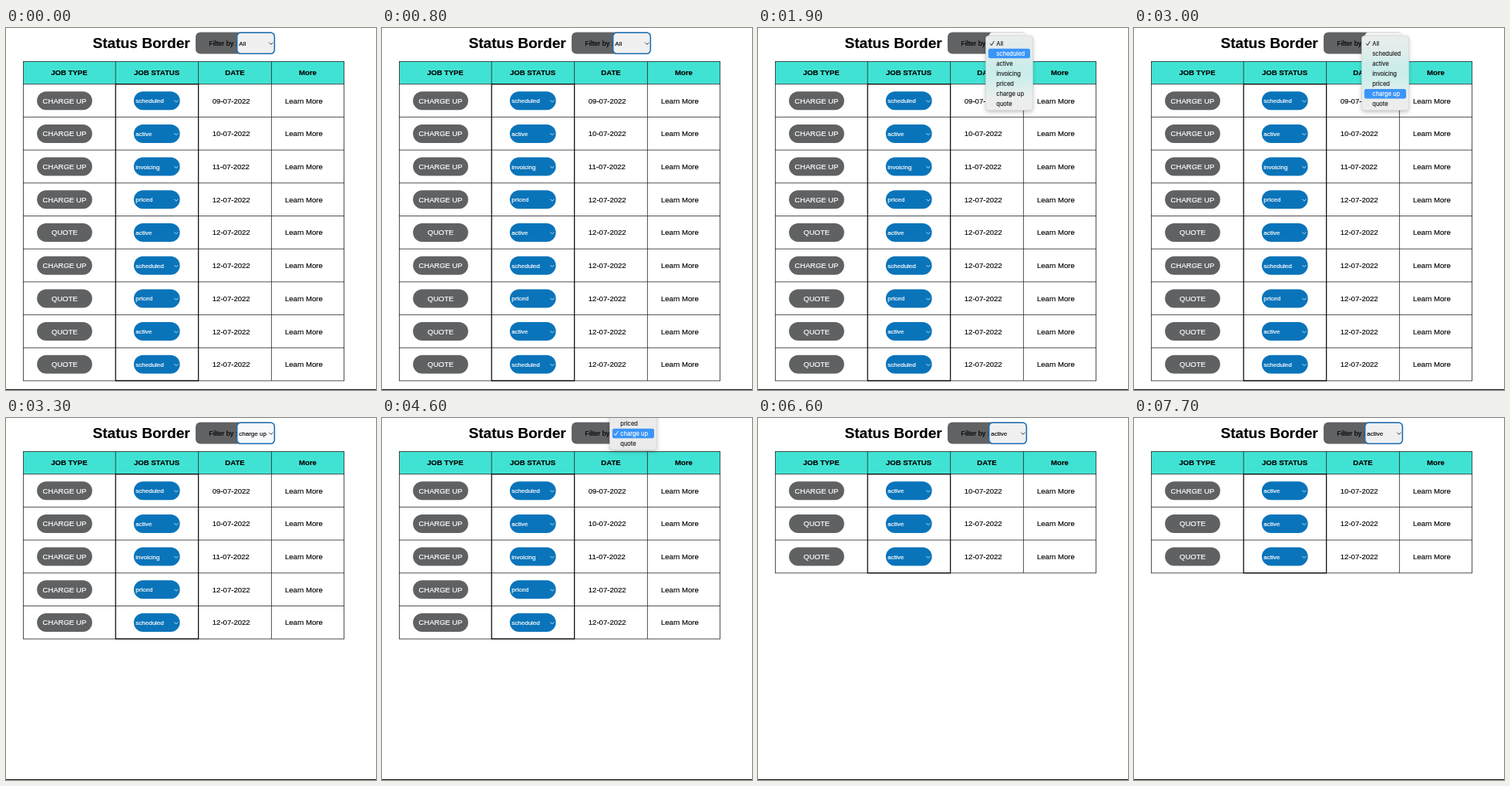
Write an HTML page that moves like this. It is 480 by 469 pixels and loops after 8200 ms.

```html
<!DOCTYPE html>
<html lang="en">
<head>
<meta charset="utf-8">
<title>Status Border</title>
<style>
html, body { margin: 0; width: 100%; height: 100%; overflow: hidden; background: #fff; }
svg { display: block; width: 480px; height: 469px; font-family: "Liberation Sans", Arial, sans-serif; font-size: 9.55px; }
text { fill: #000; stroke: #000; stroke-width: .15; }
.title { font-size: 19.1px; font-weight: bold; }
.head { font-weight: bold; text-anchor: middle; }
.grid { fill: none; stroke: #222; stroke-width: .8; }
.cell { fill: none; stroke: #111; stroke-width: 1.3; }
.type { fill: #5f6163; }
.status { fill: #0a74ba; }
.light { fill: #fff; stroke: #fff; stroke-width: .2; }
.mid { text-anchor: middle; }
.small { font-size: 8px; }
.chevron { fill: none; stroke: #222; stroke-width: .9; }
.chevron.pale { stroke: #d5e8f5; }
.menu text { font: 7.5px Inter, sans-serif; fill: #1c1c1c; stroke: #1c1c1c; }
.menu .on { fill: #fff; stroke: #fff; }
</style>
</head>
<body>
<svg viewBox="0 0 480 469">
  <defs>
    <linearGradient id="glass" gradientUnits="userSpaceOnUse" x1="0" y1="10" x2="0" y2="107">
      <stop offset="0" stop-color="#ebecec"/>
      <stop offset=".22" stop-color="#e0ecec"/>
      <stop offset=".42" stop-color="#c9edea"/>
      <stop offset=".58" stop-color="#ceeeeb"/>
      <stop offset=".82" stop-color="#ebeeee"/>
      <stop offset="1" stop-color="#ededed"/>
    </linearGradient>
    <filter id="shadow" x="-30%" y="-20%" width="160%" height="150%">
      <feDropShadow dx="0" dy="2" stdDeviation="2.5" flood-opacity=".25"/>
    </filter>
  </defs>
  <text class="title" x="112.5" y="26">Status Border</text>
  <rect x="246" y="5.5" width="103" height="28" rx="6" fill="#616264"/>
  <text x="263.3" y="22.8" font-size="8.96">Filter by :</text>
  <g id="filter"></g>
  <g id="table"></g>
  <g id="menu" class="menu"></g>
  <path d="M0 468H480V469H0Z" fill="#111"/>
</svg>
<script>
const LOOP = 8200;
const TOP = 72.7, ROW = 42.7;
const options = ["All", "scheduled", "active", "invoicing", "priced", "charge up", "quote"];
const jobs = [
  ["CHARGE UP", "scheduled", "09"],
  ["CHARGE UP", "active", "10"],
  ["CHARGE UP", "invoicing", "11"],
  ["CHARGE UP", "priced", "12"],
  ["QUOTE", "active", "12"],
  ["CHARGE UP", "scheduled", "12"],
  ["QUOTE", "priced", "12"],
  ["QUOTE", "active", "12"],
  ["QUOTE", "scheduled", "12"]
];
// start time, chosen option, hovered option (null while the menu is closed)
const steps = [
  [0, 0, null],
  [900, 0, 0],
  [1400, 0, 1],
  [2000, 0, 3],
  [2600, 0, 5],
  [3200, 5, null],
  [4600, 5, 5],
  [5000, 5, 4],
  [5100, 5, 2],
  [6200, 2, null]
];

const el = id => document.getElementById(id);
const text = (x, y, str, cls = "") => `<text x="${x}" y="${y}" class="${cls}">${str}</text>`;
const rect = (x, y, w, h, r, attrs) =>
  `<rect x="${x}" y="${y}" width="${w}" height="${h}" rx="${r}" ${attrs}/>`;
const chevron = (x, y, cls = "") =>
  `<path class="chevron ${cls}" d="M${x - 2.5} ${y - 1.2}l2.5 2.5l2.5 -2.5"/>`;

function drawRow([type, status, day], i) {
  const y = TOP + i * ROW, mid = y + 21.5, base = mid + 3.4;
  return `<path class="grid" d="M22 ${y + ROW}H439"/>` +
    rect(40.2, mid - 12, 71.6, 24, 12, 'class="type"') +
    text(76, base, type, "light mid") +
    rect(165.8, mid - 12, 59.8, 24, 12, 'class="status"') +
    text(168.3, mid + 3, status, "light small") +
    chevron(220.8, mid + .6, "pale") +
    text(267.8, base, day + "-07-2022") +
    text(362, base, "Learn More");
}

function drawTable(choice) {
  const name = options[choice];
  const rows = jobs.filter(([type, status]) =>
    choice === 0 || status === name || type.toLowerCase() === name);
  const end = TOP + rows.length * ROW;
  const heads = [["JOB TYPE", 82], ["JOB STATUS", 195.5], ["DATE", 297], ["More", 391.5]];
  el("table").innerHTML = rect(22.5, 43.5, 416, TOP - 43.5, 0, 'fill="#40e3d3"') +
    heads.map(([str, x]) => text(x, 61.4, str, "head")).join("") +
    `<path class="grid" d="M22 43.5H439M22 ${TOP}H439M22.5 43V${end}M438.5 43V${end}` +
    `M344.4 43V${end}M142.2 43V${TOP}M249.6 43V${TOP}"/>` +
    rows.map(drawRow).join("") +
    rect(142.2, TOP, 107.4, end - TOP, 0, 'class="cell"');
}

function drawFilter(choice, open) {
  el("filter").innerHTML = open ? rect(299.5, 5.5, 49.5, 28, 5, 'fill="#f6f6f6"') :
    rect(299.7, 6, 48.6, 27.3, 5, `fill="${choice === 5 ? "#f7f9fa" : "#f0f0f0"}" stroke="#1c70b4" stroke-width="1.6"`) +
    text(302.3, 22.6, options[choice], "small") + chevron(343.8, 20);
}

function drawMenu(choice, hover) {
  if (hover === null) {
    el("menu").innerHTML = "";
    return;
  }
  const shift = -13.05 * choice;
  const fill = choice ? "#ebebeb" : "url(#glass)";
  const items = options.map((name, i) => {
    const y = 20 + shift + i * 13.05;
    const cls = i === hover ? "on" : "";
    return (cls && rect(298.8, y - 6.2, 54.2, 12.5, 2.5, 'fill="#3b95f8"')) +
      (i === choice ? `<path d="M301 ${y}l2 2.5l3.3 -5.5" fill="none" stroke="${cls ? "#fff" : "#222"}"/>` : "") +
      text(309.3, y + 2.7, name, cls);
  });
  el("menu").innerHTML =
    rect(295.3, 9.9, 61.4, 96.8 + shift, 4, `y="0"`).slice(0, 0) +
    rect(295.3, 9.9 + shift, 61.4, 96.8, 4, `fill="${fill}" stroke="#bbb" stroke-width=".4" filter="url(#shadow)"`) +
    items.join("");
}

let shown;
function frame() {
  const t = performance.now() % LOOP;
  const step = steps.findLast(s => s[0] <= t);
  if (step !== shown) {
    const [, choice, hover] = shown = step;
    drawTable(choice);
    drawFilter(choice, hover !== null);
    drawMenu(choice, hover);
  }
  requestAnimationFrame(frame);
}
frame();
</script>
</body>
</html>
```
